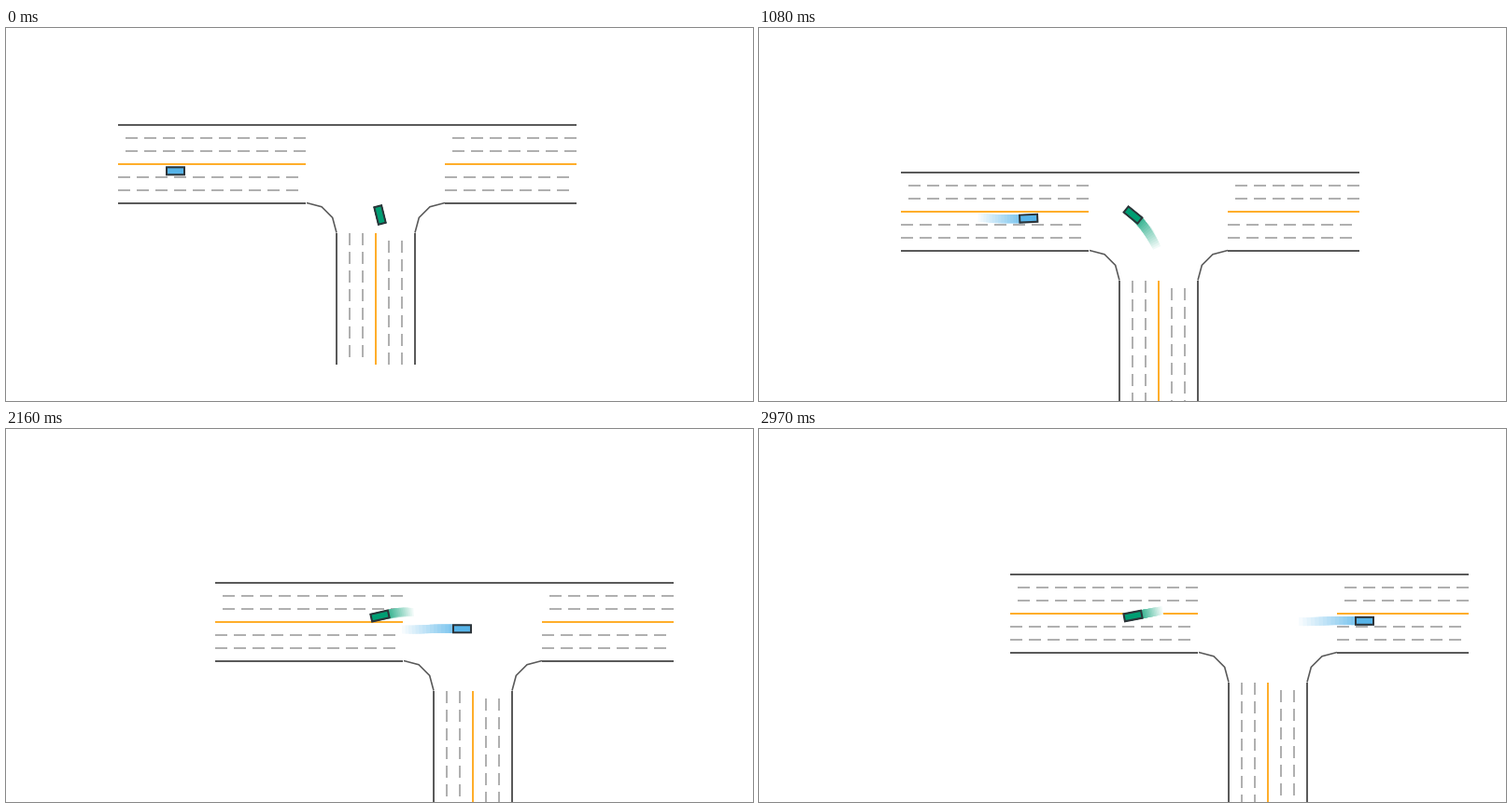
An HTML page with a canvas that plays this animation: 800x400 px, repeating every 3 s.

```html
<!DOCTYPE html>
<html lang="en">
<head>
<meta charset="utf-8">
<title>T-junction</title>
<style>
  html, body { margin: 0; height: 100%; overflow: hidden; background: #fff; }
  canvas { display: block; }
</style>
</head>
<body>
<canvas id="stage" width="800" height="400"></canvas>
<script>
const ctx = document.getElementById('stage').getContext('2d');
const STEP = 30, STEPS = 100, START = 90, TRAIL = 15;
const DARK = '#5a5a5a', GREY = '#b0b0b0', AMBER = '#ffae2b';
const GREEN = [0, 158, 115], BLUE = [86, 180, 233];

// Way points: time, road left, road top, green heading, blue place along the road.
const way = [
  [START, 120, 104, -104, 61.5],
  [510, 125, 120, -107, 79.5],
  [1080, 152.2, 155, -141, 136.5],
  [1380, 175, 166, -156, 170.5],
  [1860, 205.3, 168, -190, 224.5],
  [2460, 242, 161, -191, 306.5],
  [2970, 269, 156, -191, 379.5]
];

// Cubic Hermite curve through one column of the way points, starting at rest.
function along(col, t) {
  const last = way.length - 1;
  const i = Math.min(way.findLastIndex(p => p[0] <= t), last - 1);
  const slope = j => {
    if (j === 0) return 0;
    const a = way[j - 1], b = way[Math.min(j + 1, last)];
    return (b[col] - a[col]) / (b[0] - a[0]);
  };
  const a = way[i], b = way[i + 1];
  const h = b[0] - a[0], s = (t - a[0]) / h, r = 1 - s;
  return a[col] * r * r * (1 + 2 * s) + b[col] * s * s * (3 - 2 * s)
    + h * s * r * (slope(i) * r - slope(i + 1) * s);
}

// Everything stands still before START; cars are placed relative to the road.
function scene(time) {
  const t = Math.max(time, START);
  const [x, y, heading, ahead] = [1, 2, 3, 4].map(col => along(col, t));
  const weave = (t - 1080) / 790 * 2 * Math.PI;
  const tilt = -2.5 * Math.cos(weave);
  return {
    x, y,
    cars: [
      { color: GREEN, x: 400.5 - x, y: 200.5 - y, turn: heading },
      {
        color: BLUE,
        x: ahead,
        y: 48.7 + t / 2000 - 0.6 * Math.sin(weave),
        turn: Math.abs(tilt) < 2 ? 0 : tilt
      }
    ]
  };
}

function line(color, ...points) {
  ctx.strokeStyle = color;
  ctx.beginPath();
  points.forEach(([x, y]) => ctx.lineTo(x, y));
  ctx.stroke();
}

function dashes(a, b) {
  ctx.setLineDash([13, 7]);
  line(GREY, a, b);
  ctx.setLineDash([]);
}

function corner(x, side) {
  const points = [0, 1, 2, 3].map(i => {
    const a = i * Math.PI / 6;
    return [x + side * 32 * Math.sin(a), 115.5 - 32 * Math.cos(a)];
  });
  ctx.lineWidth = 1.6;
  line(DARK, ...points);
  ctx.lineWidth = 2;
}

function road() {
  ctx.lineWidth = 2;
  for (const [from, to] of [[0, 201], [350, 491]]) {
    for (const y of [14, 28]) dashes([from + 8, y], [to, y]);
    for (const y of [56, 70]) dashes([from, y], [to - 8, y]);
    line(AMBER, [from, 42], [to, 42]);
    line(DARK, [from, 84], [to, 84]);
  }
  for (const x of [248, 262]) dashes([x, 116], [x, 249]);
  for (const x of [290, 304]) dashes([x, 124], [x, 257]);
  line(AMBER, [276, 116], [276, 257]);
  for (const x of [234, 318]) line(DARK, [x, 116], [x, 257]);
  line(DARK, [0, 0], [491, 0]);
  corner(202, 1);
  corner(350, -1);
}

function box({ color, x, y, turn }, fade, outlined) {
  ctx.save();
  ctx.translate(x, y);
  ctx.rotate(turn * Math.PI / 180);
  ctx.fillStyle = `rgb(${color.map(c => Math.round(c + (255 - c) * fade))})`;
  ctx.fillRect(-10, -4.5, 20, 9);
  if (outlined) {
    ctx.lineWidth = 2;
    ctx.strokeStyle = '#2c3338';
    ctx.strokeRect(-9.5, -4, 19, 8);
  }
  ctx.restore();
}

function draw(t) {
  const now = scene(t);
  ctx.clearRect(0, 0, 800, 400);
  ctx.save();
  ctx.translate(Math.round(now.x), Math.round(now.y));
  road();
  ctx.restore();

  ctx.save();
  ctx.translate(now.x, now.y);
  for (let i = TRAIL - 1; i > 0; i--)
    for (const car of scene(t - i * STEP).cars) box(car, 0.2 + 0.8 * i / TRAIL, false);
  for (const car of now.cars) box(car, 0, true);
  ctx.restore();
}

const start = performance.now();
function tick() {
  const step = Math.floor((performance.now() - start) / STEP) % STEPS;
  draw(step * STEP);
  requestAnimationFrame(tick);
}
tick();
</script>
</body>
</html>
```
